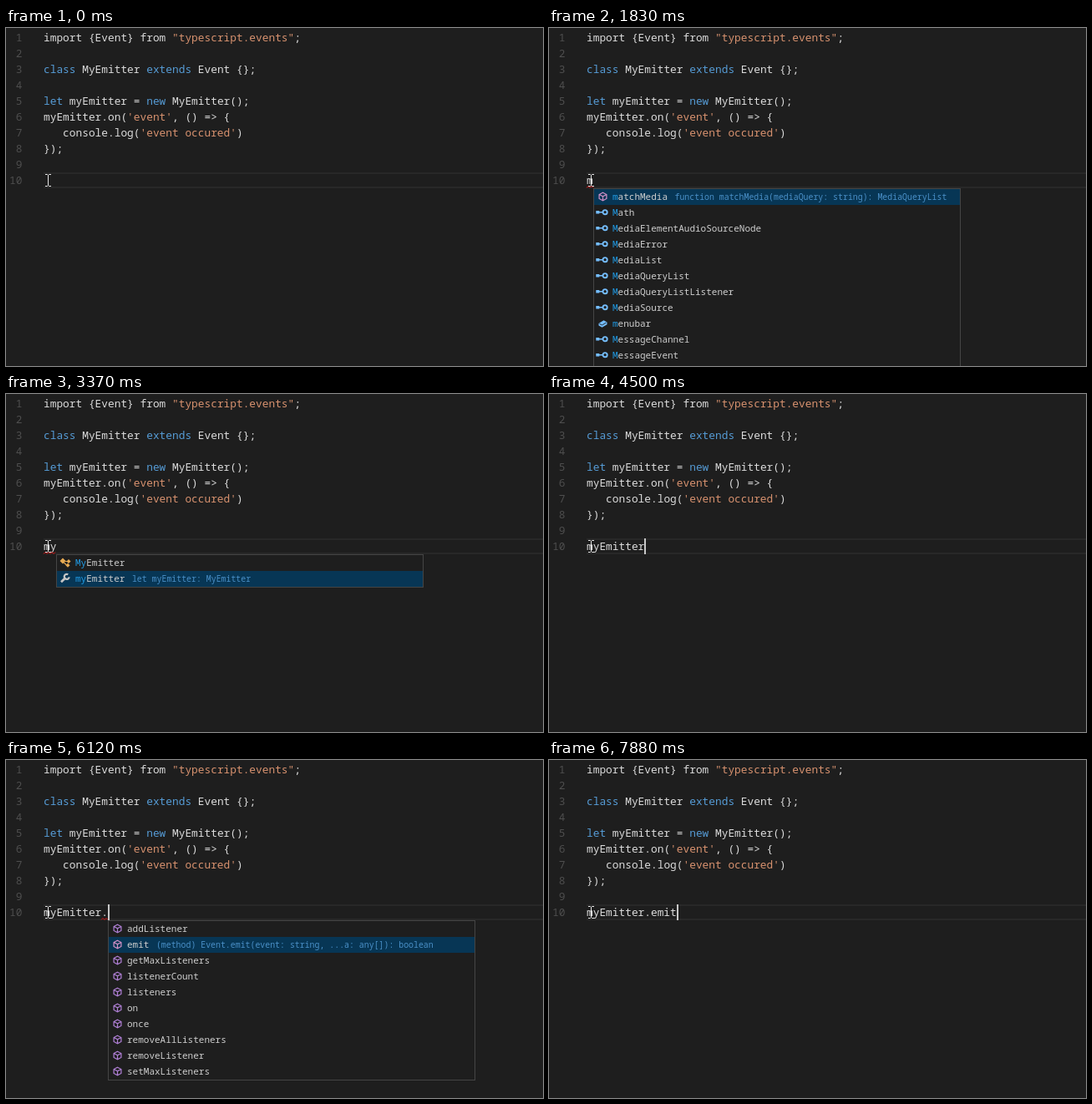
An HTML page with a canvas that plays this animation: 643 by 405 pixels, repeating every 8000 ms.

```html
<!DOCTYPE html>
<html lang="en">
<head>
<meta charset="utf-8">
<title>Editor completion</title>
<style>
  html, body { margin: 0; width: 643px; height: 405px; overflow: hidden; background: #1e1e1e; }
  canvas { display: block; }
</style>
</head>
<body>
<canvas id="stage" width="643" height="405"></canvas>
<script>
const ctx = document.getElementById('stage').getContext('2d', { alpha: false });
const LOOP = 8000, LEFT = 45, CHAR = 7.7, LINE = 19, ROW_TOP = 173;
const mono = px => `${px}px "Noto Sans Mono", "DejaVu Sans Mono", monospace`;
const CODE_FONT = mono(12.83), LABEL_FONT = mono(11), DETAIL_FONT = mono(9.9);
const BG = '#1e1e1e', TEXT = '#dcdcdc', BLUE = '#569cd6', STRING = '#d8926f';

const code = [
  'import {Event} from "typescript.events";',
  '',
  'class MyEmitter extends Event {};',
  '',
  'let myEmitter = new MyEmitter();',
  "myEmitter.on('event', () => {",
  "   console.log('event occured')",
  '});'
];

// Lists of completions: [icon, label, detail]
const mediaList = {
  col: 1, match: 1, height: 232, items: [
    ['method', 'matchMedia', 'function matchMedia(mediaQuery: string): MediaQueryList'],
    ...['Math', 'MediaElementAudioSourceNode', 'MediaError', 'MediaList', 'MediaQueryList',
      'MediaQueryListListener', 'MediaSource'].map(s => ['type', s]),
    ['field', 'menubar'], ['type', 'MessageChannel'], ['type', 'MessageEvent']
  ]
};
const emitterList = {
  col: 2, match: 2, height: 40, items: [
    ['class', 'MyEmitter'],
    ['wrench', 'myEmitter', 'let myEmitter: MyEmitter']
  ]
};
const memberDetails = {
  addListener: '(method) Event.addListener(event: string, listener: any',
  emit: '(method) Event.emit(event: string, ...a: any[]): boolean'
};
const memberList = {
  col: 10, match: 0, height: 192,
  items: ['addListener', 'emit', 'getMaxListeners', 'listenerCount', 'listeners', 'on', 'once',
    'removeAllListeners', 'removeListener', 'setMaxListeners'].map(s => ['method', s, memberDetails[s]])
};

// Timelines of [time, value]
const typed = [[0, ''], [240, 'm'], [1960, 'my'], [3490, 'myEmitter'], [4760, 'myEmitter.'], [6920, 'myEmitter.emit']];
const popups = [[0, null], [390, [mediaList, 0]], [2080, [emitterList, 1]], [3490, null],
  [4890, [memberList, 0]], [6120, [memberList, 1]], [6920, null]];
const errors = [[0, null], [390, [0, 1]], [2080, [0, 2]], [3490, [0, 9]], [3640, null], [4890, [9, 10]], [6920, null]];
const caretToggles = [120, 820, 1270, 1830, 1960, 2380, 2960, 3370, 3490, 3910, 4500, 5320, 5720, 6240, 6770, 7320, 7880];
const SCROLLBAR_HIDES = 1270;

const at = (steps, t) => steps.filter(s => s[0] <= t).pop()[1];
const colX = col => Math.round(LEFT + col * CHAR);

function rect(color, x, y, w, h) {
  ctx.fillStyle = color;
  ctx.fillRect(x, y, w, h);
}
function text(str, x, y, color, font) {
  ctx.font = font;
  ctx.fillStyle = color;
  ctx.fillText(str, x, y);
}
function path(d, stroke, fill, width = 1) {
  const p = new Path2D(d);
  if (fill) { ctx.fillStyle = fill; ctx.fill(p); }
  if (stroke) { ctx.strokeStyle = stroke; ctx.lineWidth = width; ctx.stroke(p); }
}

function drawCode() {
  ctx.textAlign = 'right';
  for (let i = 0; i < 10; i++) text(i + 1, 19.4, 16 + i * LINE, '#4e4e4e', CODE_FONT);
  ctx.textAlign = 'left';
  code.forEach((line, i) => {
    for (const m of line.matchAll(/\b(?:class|extends|let|new)\b|'[^']*'|"[^"]*"|\w+|[^\w\s'"]+/g)) {
      const color = /^['"]/.test(m[0]) ? STRING : /^(class|extends|let|new)$/.test(m[0]) ? BLUE : TEXT;
      text(m[0], LEFT + m.index * CHAR, 16 + i * LINE, color, CODE_FONT);
    }
  });
}

// Icons are drawn around the centre of a row
const icons = {
  method(selected) {
    path('M0-4.8 4.4-2.5V2.5L0 4.8-4.4 2.5V-2.5ZM-4.4-2.5 0-.2 4.4-2.5M0-.2V4.8', selected ? '#d591c8' : '#b180d7', null, 1.2);
  },
  type() {
    path('M-8.2-2h4v3.6h-4ZM-4.5-.9H0V.5h-4.5Z', null, '#75beff');
    path('M5.2-.3a2.6 2.6 0 1 1-5.2 0a2.6 2.6 0 1 1 5.2 0Z', '#75beff', null, 1.9);
  },
  field() {
    path('M-5 0 1-3.8 5-1.6V1.2L-1 4.8-5 2.6Z', null, '#75beff');
    path('M-4 .4-1 2 4-1', BG, null, .9);
  },
  class() {
    path('M-6-2-2.5-5.5 1-2-2.5 1.5ZM2-1.5 4.5-4 7-1.5 4.5 1ZM1 3.2 3.5.7 6 3.2 3.5 5.7Z', null, '#e8ab53');
    path('M-1 0 2 3.2M0-1.5H4', '#e8ab53', null, 1.2);
  },
  wrench() {
    path('M-4.5 4.2 1-1', '#c5c5c5', null, 2.8);
    path('M3.8-4.7A3 3 0 1 0 5.2-1.6', '#c5c5c5', null, 2.3);
  }
};

function drawPopup([list, selected], t) {
  const x = colX(list.col), y = 192, w = 440;
  rect('#454545', x, y, w, list.height);
  rect(BG, x + 1, y + 1, w - 2, list.height - 2);
  list.items.forEach(([icon, label, detail], i) => {
    const top = y + 1 + i * LINE, base = top + 13, on = i === selected;
    if (on) rect('#073655', x + 1, top, w - 2, LINE);
    ctx.save();
    ctx.translate(x + (list === emitterList ? 10.5 : 11.5), top + 9);
    icons[icon](on);
    ctx.restore();
    const labelX = x + 23, rest = labelX + list.match * 6.6;
    text(label.slice(0, list.match), labelX, base, '#219be4', LABEL_FONT);
    text(label.slice(list.match), rest, base, '#cecece', LABEL_FONT);
    if (on && detail) text(detail, labelX + label.length * 6.6 + 8.5, base, '#4a90c8', DETAIL_FONT);
  });
  if (list === mediaList && t < SCROLLBAR_HIDES) rect('rgba(121,121,121,.4)', x + w - 11, y + 1, 10, 97);
}

function drawSquiggle([from, to]) {
  const end = colX(to);
  let d = '';
  for (let x = colX(from), i = 0; x <= end; x += 2, i++) d += `${i ? 'L' : 'M'}${x} ${i % 2 ? 189.5 : 191.5}`;
  path(d, '#e01010');
}

function drawPointer() {
  path('M47 175.5H49.5L50.5 176.5 51.5 175.5H54M50.5 176V189M47 189.5H49.5L50.5 188.5 51.5 189.5H54', '#e6e6e6');
}

function draw(t) {
  const line = at(typed, t), error = at(errors, t), popup = at(popups, t);
  rect(BG, 0, 0, 643, 405);
  rect('#282828', LEFT, ROW_TOP, 598, LINE);
  rect(BG, LEFT, ROW_TOP + 2, 598, LINE - 4);
  drawCode();
  text(line, LEFT, ROW_TOP + 14, TEXT, CODE_FONT);
  if (error) drawSquiggle(error);
  if (caretToggles.filter(s => s <= t).length % 2) rect('#c8c8c8', colX(line.length), ROW_TOP, 2, LINE);
  if (popup) drawPopup(popup, t);
  drawPointer();
}

const start = performance.now();
function tick() {
  draw((performance.now() - start) % LOOP);
  requestAnimationFrame(tick);
}
tick();
</script>
</body>
</html>
```
